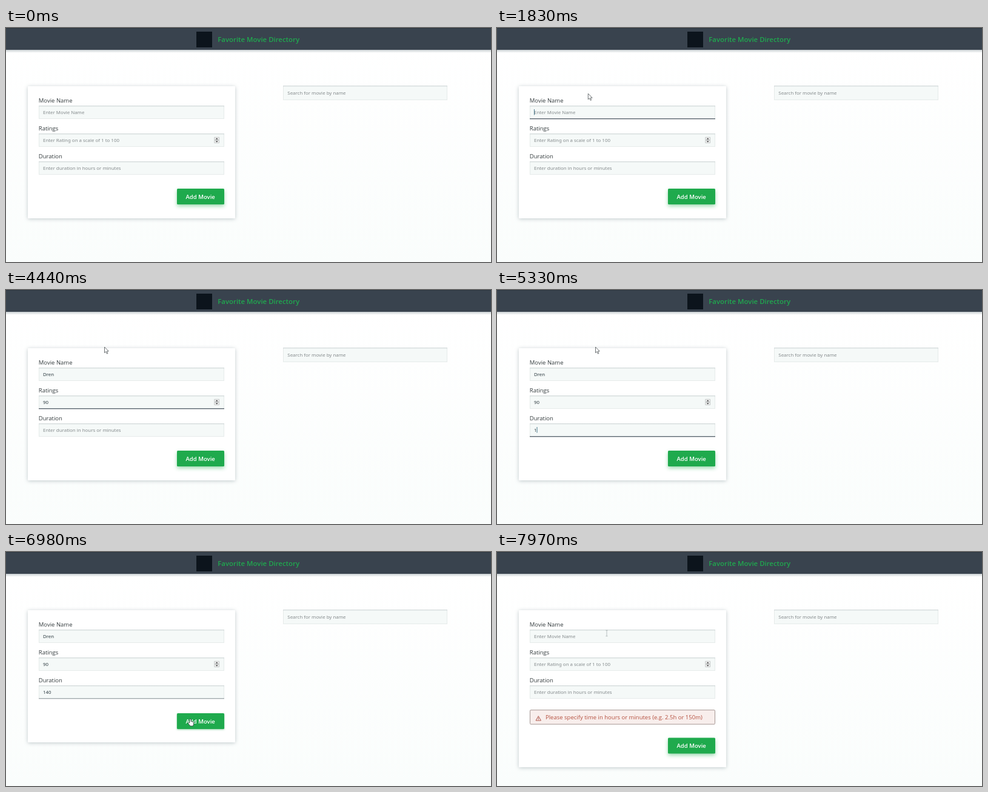
An HTML page that plays this animation: 800 px wide and 386 px high, repeating every 8 s.

```html
<!DOCTYPE html>
<html lang="en">
<head>
<meta charset="utf-8">
<title>Favorite Movie Directory</title>
<style>
  html, body { margin: 0; width: 100%; height: 100%; overflow: hidden; background: #fff; }
  svg { display: block; width: 800px; height: 386px; }
  text { font-family: "Open Sans", sans-serif; font-size: 9.5px; fill: #333b3d; }
  .strong { font-weight: 600; }
  .entry { font-family: "Noto Sans", sans-serif; font-size: 7.9px; fill: #2c3a40; }
  .hint { fill: #858b8d; }
  #card { filter: drop-shadow(0 1px 3px #26404a48); }
  #button rect { filter: drop-shadow(0 3px 3px #1faa4d70); }
  #button.hover rect { filter: drop-shadow(0 1px 1.5px #1faa4d80); }
</style>
</head>
<body>
<svg viewBox="0 0 800 386">
  <defs>
    <linearGradient id="page" x2="0" y2="1">
      <stop offset=".1" stop-color="#fff"/>
      <stop offset="1" stop-color="#fafdfc"/>
    </linearGradient>
    <linearGradient id="shade" x2="0" y2="1">
      <stop stop-color="#26404a" stop-opacity=".25"/>
      <stop offset="1" stop-color="#26404a" stop-opacity="0"/>
    </linearGradient>
  </defs>
  <rect width="800" height="386" fill="url(#page)"/>
  <rect y="36" width="800" height="5" fill="url(#shade)"/>
  <rect width="800" height="36" fill="#39434e"/>
  <rect width="800" height="1" fill="#2b353f"/>
  <rect x="314" y="6" width="26" height="26" fill="#0c141c"/>
  <text class="strong" x="349.3" y="23" style="font-size:11.4px;fill:#20a94f">Favorite Movie Directory</text>

  <rect id="card" x="36" y="96" width="342" height="218" rx="1" fill="#fff"/>
  <g id="fields"></g>

  <g id="spinner" fill="#f1f1f1" stroke="#b4b8b8" stroke-width=".7">
    <path d="M343.8 180.3h7.8v4.4h-7.8zM343.8 185.2h7.8v4.4h-7.8z"/>
    <path d="M345.6 183.6l2.1-2.2 2.1 2.2zM345.6 186.4l2.1 2.2 2.1-2.2z" fill="#333" stroke="none"/>
  </g>

  <g id="alert">
    <rect x="54.5" y="260.7" width="305" height="23.4" rx="1.5" fill="#f8eeec" stroke="#a59692"/>
    <path d="M68.3 270.7l4.2 7.3h-8.4zM68.3 273v2.6M68.3 276.2v.9" fill="none" stroke="#a8483c" stroke-width=".9"/>
    <text x="80" y="275.8" style="fill:#b5503f">Please specify time in hours or minutes (e.g. 2.5h or 150m)</text>
  </g>

  <g id="button">
    <rect x="282" y="265" width="78" height="26" rx="1.5" fill="#1faa4d"/>
    <text class="strong" x="296.6" y="281.8" style="fill:#fff">Add Movie</text>
  </g>

  <path id="caret" stroke="#356a80" stroke-width=".9"/>
  <g id="pointer" stroke-linejoin="round">
    <path id="arrow" d="M0 0v9.6l2.2-2 1.7 3.6 1.5-.7-1.6-3.5h3z" fill="#fff" stroke="#4a5052" stroke-width=".8"/>
    <path id="beam" d="M-1.6-4.8h3.2M0-4.8v9.6M-1.6 4.8h3.2" fill="none" stroke="#a9b2b2" stroke-width=".8"/>
    <path id="hand" d="M-1.2 6V.4q0-1.2 1.1-1.2t1.1 1.2v3l3 .6q1.5.4 1.5 1.8v2.4l-1 2.8h-4.6l-3.4-4.3q-.4-1.2 1-1.2z"
      transform="translate(0 -4)" fill="#fff" stroke="#30383a" stroke-width=".8"/>
  </g>
</svg>
<script>
const LOOP = 8000, CLEARED = 7075;
const $ = id => document.getElementById(id);
const show = (el, on) => el.style.display = on ? '' : 'none';

// Each key array holds the times at which one more letter appears.
const fields = [
  { label: 'Movie Name', hint: 'Enter Movie Name', y: 128, value: 'Dren',
    keys: [2690, 2780, 2880, 2970], focus: 1440, blur: 3370 },
  { label: 'Ratings', hint: 'Enter Rating on a scale of 1 to 100', y: 174, value: '90',
    keys: [3960, 4060], focus: 3370, blur: 4640 },
  { label: 'Duration', hint: 'Enter duration in hours or minutes', y: 220, value: '140',
    keys: [5330, 5430, 5520], focus: 4640, blur: 6980 }
];
const caretOn = [[1440, 2010], [2600, 3170], [3370, 4440], [4640, 5130], [5330, 5720], [6210, 6790]];

// start, end, steps, then from, control and end point of a curve
const moves = [
  [310, 400, 2, 800, 311, 754, 325, 708, 339],
  [590, 1350, 9, 708, 339, 360, 190, 127, 151],
  [1440, 2200, 9, 127, 151, 152, 100, 162.5, 94],
  [6120, 6790, 8, 162.5, 94, 200, 0, 304, 280],
  [7075, 7075, 1, 304, 280, 304, 277, 304, 274],
  [7770, 7970, 3, 304, 274, 204, 295, 181, 134]
];

const box = (x, y, w, h) =>
  `<rect x="${x + .5}" y="${y + .5}" width="${w - 1}" height="${h - 1}" fill="#f5f9f8" stroke="#e6ebea"/>
   <rect x="${x}" y="${y}" width="${w}" height="2.5" fill="url(#shade)" opacity=".5"/>`;

$('fields').innerHTML = box(457, 95, 271, 24) +
  '<text class="entry hint" x="464.3" y="110.4">Search for movie by name</text>' +
  fields.map(f => `<text x="53.8" y="${f.y - 5}">${f.label}</text>${box(54, f.y, 306, 22)}
    <rect class="line" x="54" y="${f.y + 21}" width="306" height="1.4" fill="#5d6871"/>
    <text class="entry value" x="61" y="${f.y + 14}"></text>`).join('');
const lines = document.querySelectorAll('.line');
const values = document.querySelectorAll('.value');

const clamp = v => Math.max(0, Math.min(1, v));
// Focus colour fades over two visible steps.
const fade = (t, at) => t < at ? 0 : t < at + 90 ? .5 : 1;

function pointerAt(t) {
  const move = moves.filter(m => t >= m[0]).pop();
  if (!move) return null;
  const [a, b, n, x0, y0, x1, y1, x2, y2] = move;
  const step = n > 1 ? Math.floor((t - a + 3) / (b - a) * (n - 1)) + 1 : 1;
  const p = clamp(step / n), q = 1 - p;
  const mix = (u, v, w) => q * q * u + 2 * q * p * v + p * p * w;
  return [mix(x0, x1, x2), mix(y0, y1, y2)];
}

function drawPointer(t, failed) {
  const at = pointerAt(t);
  show($('pointer'), at);
  if (!at) return;
  const [x, y] = at;
  const inForm = x > 54 && x < 360;
  const inText = inForm && (fields.some(f => y >= f.y && y < f.y + 24) || failed && y > 260 && y < 285);
  const onButton = !failed && x > 282 && x < 360 && y > 265 && y < 292;
  show($('beam'), inText);
  show($('hand'), onButton);
  show($('arrow'), !inText && !onButton);
  $('pointer').setAttribute('transform', `translate(${x} ${y})`);
}

function draw(t) {
  const failed = t >= CLEARED;
  fields.forEach((f, i) => {
    const count = failed ? 0 : f.keys.filter(k => t >= k).length;
    values[i].textContent = count ? f.value.slice(0, count) : f.hint;
    values[i].classList.toggle('hint', !count);
    lines[i].setAttribute('opacity', fade(t, f.focus) - fade(t, f.blur));
    if (t >= f.focus && t < f.blur) {
      const x = 61.5 + (count ? values[i].getComputedTextLength() : 0);
      $('caret').setAttribute('d', `M${x} ${f.y + 6}v9.5`);
    }
  });
  show($('caret'), caretOn.some(([a, b]) => t >= a && t < b));
  show($('alert'), failed);
  $('card').setAttribute('height', failed ? 259 : 218);
  const hover = t >= 6790 && !failed;
  $('button').classList.toggle('hover', hover);
  $('button').setAttribute('transform', `translate(0 ${failed ? 41.5 : hover ? 1 : 0})`);
  drawPointer(t, failed);
}

const start = performance.now();
function tick() {
  draw((performance.now() - start) % LOOP);
  requestAnimationFrame(tick);
}
tick();
</script>
</body>
</html>
```
